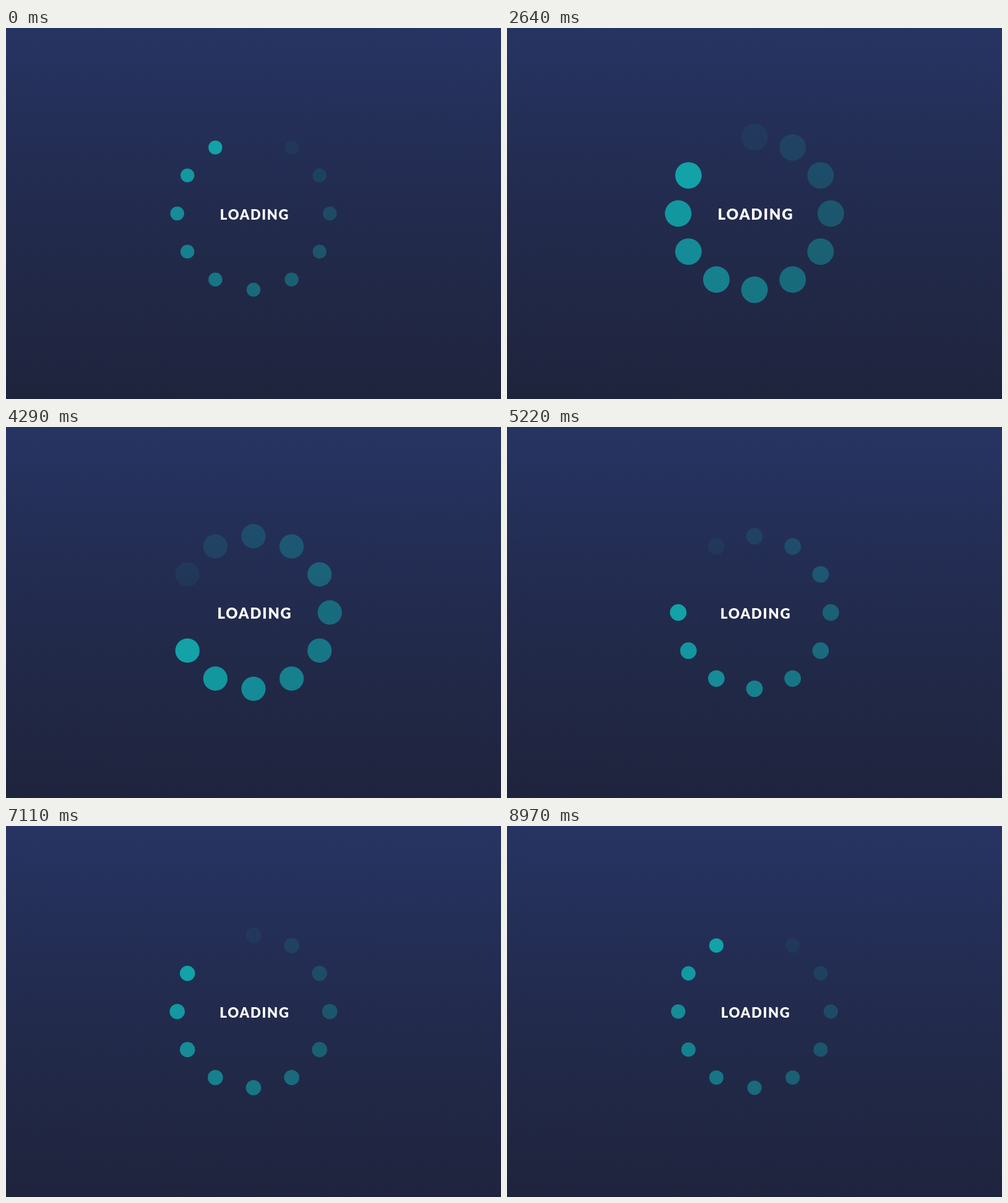
Animation, 800 px wide and 600 px high, one loop 9 s. Source, as an HTML page with a canvas:

```html
<!DOCTYPE html>
<html lang="en">
<head>
<meta charset="utf-8">
<title>Loading</title>
<style>
  html, body { margin: 0; width: 100%; height: 100%; overflow: hidden; background: #222b4d; }
  canvas { display: block; }
</style>
</head>
<body>
<canvas id="stage" width="800" height="600"></canvas>
<script>
const ctx = document.getElementById('stage').getContext('2d');
const LOOP = 9000, TICK = 30, TURN = 900;
const SLOTS = 12, RING = 123.3;

const backdrop = ctx.createLinearGradient(404, 0, 396, 600);
backdrop.addColorStop(0, '#273463');
backdrop.addColorStop(0.25, '#242f58');
backdrop.addColorStop(0.5, '#222b4d');
backdrop.addColorStop(1, '#1f243d');

function drawDots(head, radius) {
  ctx.fillStyle = '#12a2a8';
  for (let slot = 0; slot < SLOTS; slot++) {
    // Brightest at the head, fading to nothing just in front of it
    const age = (head - slot + SLOTS) % SLOTS;
    const angle = slot * 2 * Math.PI / SLOTS;
    ctx.globalAlpha = 1 - age / (SLOTS - 1);
    ctx.beginPath();
    ctx.arc(400 + RING * Math.sin(angle), 300 - RING * Math.cos(angle), radius, 0, 2 * Math.PI);
    ctx.fill();
  }
  ctx.globalAlpha = 1;
}

function drawLabel(scale) {
  ctx.save();
  ctx.translate(402, 310.4);
  ctx.scale(scale, scale);
  ctx.font = '900 22px Lato, "Open Sans", sans-serif';
  ctx.letterSpacing = '1.65px';
  ctx.textAlign = 'center';
  ctx.fillStyle = '#fff';
  ctx.fillText('LOADING', 0, 0);
  ctx.restore();
}

function draw(now) {
  const t = Math.floor(now % LOOP / TICK) * TICK;
  const swell = 1 - Math.abs(t % (2 * TURN) - TURN) / TURN;
  const head = (SLOTS - 1 + Math.round(t * SLOTS / TURN)) % SLOTS;

  ctx.fillStyle = backdrop;
  ctx.fillRect(0, 0, 800, 600);
  drawDots(head, 11.2 + 11 * swell);
  drawLabel(1 + 0.1 * swell);
}

const start = performance.now();
function frame() {
  draw(performance.now() - start);
  requestAnimationFrame(frame);
}
frame();
</script>
</body>
</html>
```
